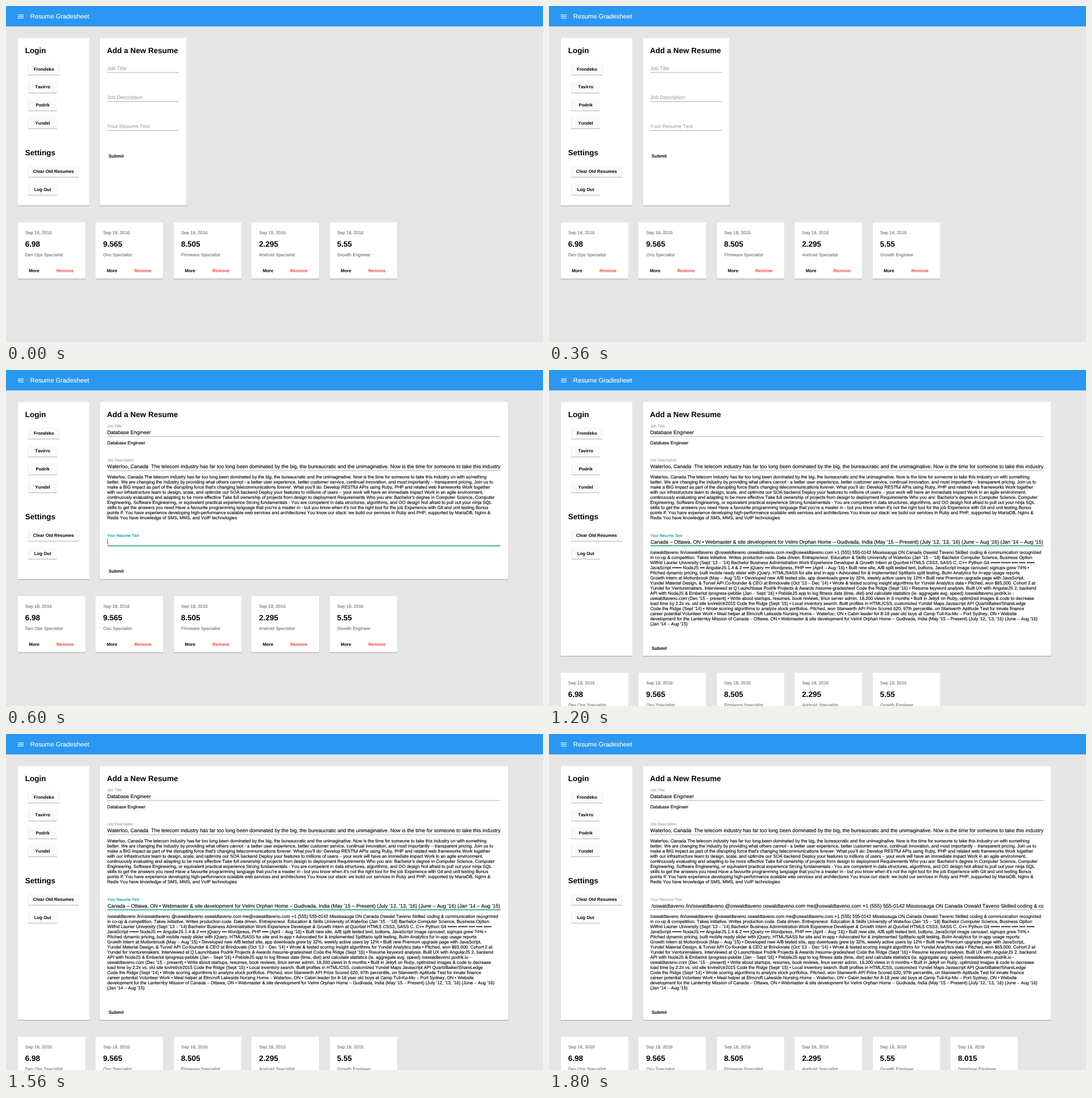
Animation of 947x592 px, one loop 2400 ms. Source, as an HTML page:

```html
<!DOCTYPE html>
<html lang="en">
<head>
<meta charset="utf-8">
<title>Resume Gradesheet</title>
<style>
  html, body { margin: 0; height: 100%; overflow: hidden; background: #e5e5e5; }
  svg { display: block; width: 100vw; height: 100vh; }
  text {
    font-family: "Liberation Sans", Arial, sans-serif; font-kerning: none;
    text-rendering: geometricPrecision; white-space: pre; stroke-width: .14px;
  }
  text[font-weight] { stroke-width: 0; }
  .card { fill: #fff; filter: drop-shadow(0 1px .5px rgba(0, 0, 0, .32)); }
  .button { fill: #fafafa; filter: drop-shadow(0 1px .6px rgba(0, 0, 0, .32)); }
</style>
</head>
<body>
<svg id="stage" viewBox="0 0 947 592"></svg>
<script>
const STEP_MS = 600, STEPS = 4;
const SMALL = 6.75, BODY = 7.875, INPUT = 9, BAR = 11.25, HEAD = 13.5;
const GREY = '#757575', HINT = '#a3a3a3', TEAL = '#009688', RED = '#f44336';
const LEFT = 178.5, LINE = 9.02;

const description = `Waterloo, Canada The telecom industry has far too long been dominated by the big, the bureaucratic and the unimaginative. Now is the time for someone to take this industry on with something
better. We are changing the industry by providing what others cannot - a better user experience, better customer service, continual innovation, and most importantly – transparent pricing. Join us to
make a BIG impact as part of the disrupting force that's changing telecommunications forever. What you'll do: Develop RESTful APIs using Ruby, PHP and related web frameworks Work together
with our infrastructure team to design, scale, and optimize our SOA backend Deploy your features to millions of users – your work will have an immediate impact Work in an agile environment,
continuously evaluating and adapting to be more effective Take full ownership of projects from design to deployment Requirements Who you are: Bachelor's degree in Computer Science, Computer
Engineering, Software Engineering, or equivalent practical experience Strong fundamentals - You are competent in data structures, algorithms, and OO design Not afraid to pull out your ninja SQL
skills to get the answers you need Have a favourite programming language that you’re a master in - but you know when it’s not the right tool for the job Experience with Git and unit testing Bonus
points if: You have experience developing high-performance scalable web services and architectures You know our stack: we build our services in Ruby and PHP, supported by MariaDB, Nginx &
Redis You have knowledge of SMS, MMS, and VoIP technologies`.split('\n');

const resume = `/oswaldtaveno /in/oswaldtaveno @oswaldtaveno oswaldtaveno.com me@oswaldtaveno.com +1 (555) 555-0142 Mississauga ON Canada Oswald Taveno Skilled coding & communication recognized
in co-op & competition. Takes initiative. Writes production code. Data driven. Entrepreneur. Education & Skills University of Waterloo (Jan ’15 – ’18) Bachelor Computer Science, Business Option
Wilfrid Laurier University (Sept ’13 – ’14) Bachelor Business Administration Work Experience Developer & Growth Intern at Quorbel HTML5 CSS3, SASS C, C++ Python Git •••••• •••••• •••• •••• •••••
JavaScript •••••• NodeJS ••• AngularJS 1.4 & 2 •••• jQuery ••• Wordpress, PHP •••• (April – Aug ’16) • Built new site, A/B split tested text, buttons, JavaScript image carousel; signups grew 74% •
Pitched dynamic pricing, built mobile ready slider with jQuery, HTML/SASS for site and in-app • Advocated for & implemented Splittario split testing, Bulm Analytics for in-app usage reports
Growth Intern at Motionbrook (May – Aug ’15) • Developed new A/B tested site, app downloads grew by 32%, weekly active users by 12% • Built new Premium upgrade page with JavaScript,
Yundel Material Design, & Torvel API Co-founder & CEO at Brindovate (Oct ’13 – Dec ’14) • Wrote & tested scoring insight algorithms for Yundel Analytics data • Pitched, won $65,000. Cohort 2 at
Yundel for Venturemakers. Interviewed at Q Launchbase Podrik Projects & Awards /resume-gradesheet Code the Ridge (Sept ’16) • Resume keyword analysis. Built UX with AngularJS 2, backend
API with NodeJS & Emberlot /progress-pebble (Jan – Sept ’16) • PebbleJS app to log fitness data (time, dist) and calculate statistics (ie. aggregate avg. speed) /oswaldtaveno.podrik.io -
oswaldtaveno.com (Dec ’15 – present) • Write about startups, resumes, book reviews, linux server admin. 18,200 views in 6 months • Built in Jekyll on Ruby, optimized images & code to decrease
load time by 2.2x vs. old site tovirel/ctr2015 Code the Ridge (Sept ’15) • Local inventory search. Built profiles in HTML/CSS, customized Yundel Maps Javascript API QuartzBaker/ShareLedge
Code the Ridge (Sept ’14) • Wrote scoring algorithms to analyze stock portfolios. Pitched, won Stanwerth API Prize Scored 620, 97th percentile, on Stanwerth Aptitude Test for innate finance
career potential Volunteer Work • Meal helper at Elmcroft Lakeside Nursing Home – Waterloo, ON • Cabin leader for 8-18 year old boys at Camp Tuli-Ka-Mo – Port Sydney, ON • Website
development for the Lanternby Mission of Canada – Ottawa, ON • Webmaster & site development for Velmi Orphan Home – Gudivada, India (May ’15 – Present) (July ’12, ’13, ’16) (June – Aug ’16)
(Jan ’14 – Aug ’15)`.split('\n');

const scores = [
  ['6.98', 'Dev Ops Specialist'], ['9.565', 'Ovu Specialist'], ['8.505', 'Firmware Specialist'],
  ['2.295', 'Android Specialist'], ['5.55', 'Growth Engineer'], ['8.015', 'Database Engineer']
];

const rect = (x, y, w, h, attrs) => `<rect x="${x}" y="${y}" width="${w}" height="${h}" ${attrs}/>`;
const text = (x, y, str, size = BODY, fill = '#000', attrs = '') =>
  `<text x="${x}" y="${y}" font-size="${size}" fill="${fill}" stroke="${fill}" ${attrs}>${str.replace(/&/g, '&amp;')}</text>`;
const bold = (x, y, str, size = BODY, fill = '#000', attrs = '') =>
  text(x, y, str, size, fill, 'font-weight="700" ' + attrs);
const lines = (y, list) => list.map((str, i) => text(LEFT, y + i * LINE, str)).join('');
const card = (x, y, w, h) => rect(x, y, w, h, 'rx="1" class="card"');

function button(y, label, width = 50.6) {
  return rect(39.4, y, width, 20.2, 'rx="1" class="button"') +
    bold(39.4 + width / 2, y + 12.9, label, BODY, '#000', 'text-anchor="middle"');
}

function field(y, right, label, value, { active = false, x = LEFT, atEnd = false } = {}) {
  const floating = value || active;
  const thick = active ? 1.4 : 0.7;
  return text(LEFT, floating ? y - 12 : y, label, floating ? SMALL : INPUT, active ? TEAL : HINT) +
    rect(LEFT, y + 4.1 - thick / 2, right - LEFT, thick, `fill="${active ? TEAL : '#8c8c8c'}"`) +
    `<g clip-path="url(#inputs)">${text(atEnd ? right - 0.5 : x, y, value, INPUT, '#000', atEnd ? 'text-anchor="end"' : '')}</g>`;
}

function scoreCard([score, title], i, y) {
  const x = 20.5 + i * 137.5;
  return card(x, y, 119.4, 99.2) +
    text(x + 13.4, y + 20.6, 'Sep 18, 2016', BODY, GREY) +
    bold(x + 13.2, y + 42.2, score, HEAD) +
    text(x + 13.4, y + 59.6, title, BODY, GREY) +
    bold(x + 19.7, y + 87.9, 'More') +
    bold(x + 68.4, y + 87.9, 'Remove', BODY, RED);
}

function form(step) {
  const right = step ? 872 : 305;
  const [descY, resumeY, submitY] = [[164.3, 215.4, 266.9], [173.3, 305.6, 357], [173.3, 305.6, 492.5]][Math.min(step, 2)];
  const resumeValue = ['', '',
    resume.slice(-2).join(' ').replace(/^.*(?=Canada –)/, ''), resume[0] + ' ' + resume[1]][step];
  const title = step ? 'Database Engineer' : '';
  const pitch = step ? description[0].replace('Canada ', 'Canada\u00a0 ') : '';
  return bold(178, 82.9, 'Add a New Resume', HEAD) +
    field(113, right, 'Job Title', title) +
    field(descY, right, 'Job Description', pitch) +
    field(resumeY, right, 'Your Resume Text', resumeValue,
      { active: step === 1 || step === 2, x: 181, atEnd: step === 2 }) +
    (step ? text(LEFT, 130.9, title) + lines(191, description) : '') +
    (step === 1 ? rect(178.8, 297, 0.8, 10.3, 'fill="#222"') : '') +
    (step > 1 ? lines(323.6, resume) : '') +
    bold(181, submitY, 'Submit');
}

function draw(step) {
  const bottom = [351.6, 368.7, 503.8, 503.8][step];
  return `<clipPath id="inputs">${rect(LEFT, 100, 693.5, 220, '')}</clipPath>` +
    rect(0, 0, 947, 592, 'fill="#e5e5e5"') +
    rect(0, 0, 947, 36, 'fill="#2a98f2"') +
    [15.1, 17.9, 20.7].map(y => rect(20.9, y, 10.1, 1.1, 'fill="#fff"')).join('') +
    text(42.8, 22, 'Resume Gradesheet', BAR, '#fff') +
    card(20.5, 56.4, 126.6, bottom - 56.4) +
    bold(33.8, 82.9, 'Login', HEAD) +
    button(101, 'Frondeko', 54.8) + button(132.5, 'Tavirro') + button(164, 'Podrik') + button(195.6, 'Yundel') +
    bold(33.8, 262.9, 'Settings', HEAD) +
    button(281, 'Clear Old Resumes', 89) + button(312.6, 'Log Out') +
    card(165.5, 56.4, step ? 720 : 153, bottom - 56.4) +
    form(step) +
    scores.slice(0, step === 3 ? 6 : 5).map((s, i) => scoreCard(s, i, bottom + 29.7)).join('');
}

const stage = document.getElementById('stage');
let shown = -1;
function tick() {
  const step = Math.floor(performance.now() / STEP_MS) % STEPS;
  if (step !== shown) stage.innerHTML = draw(shown = step);
  requestAnimationFrame(tick);
}
tick();
</script>
</body>
</html>
```
